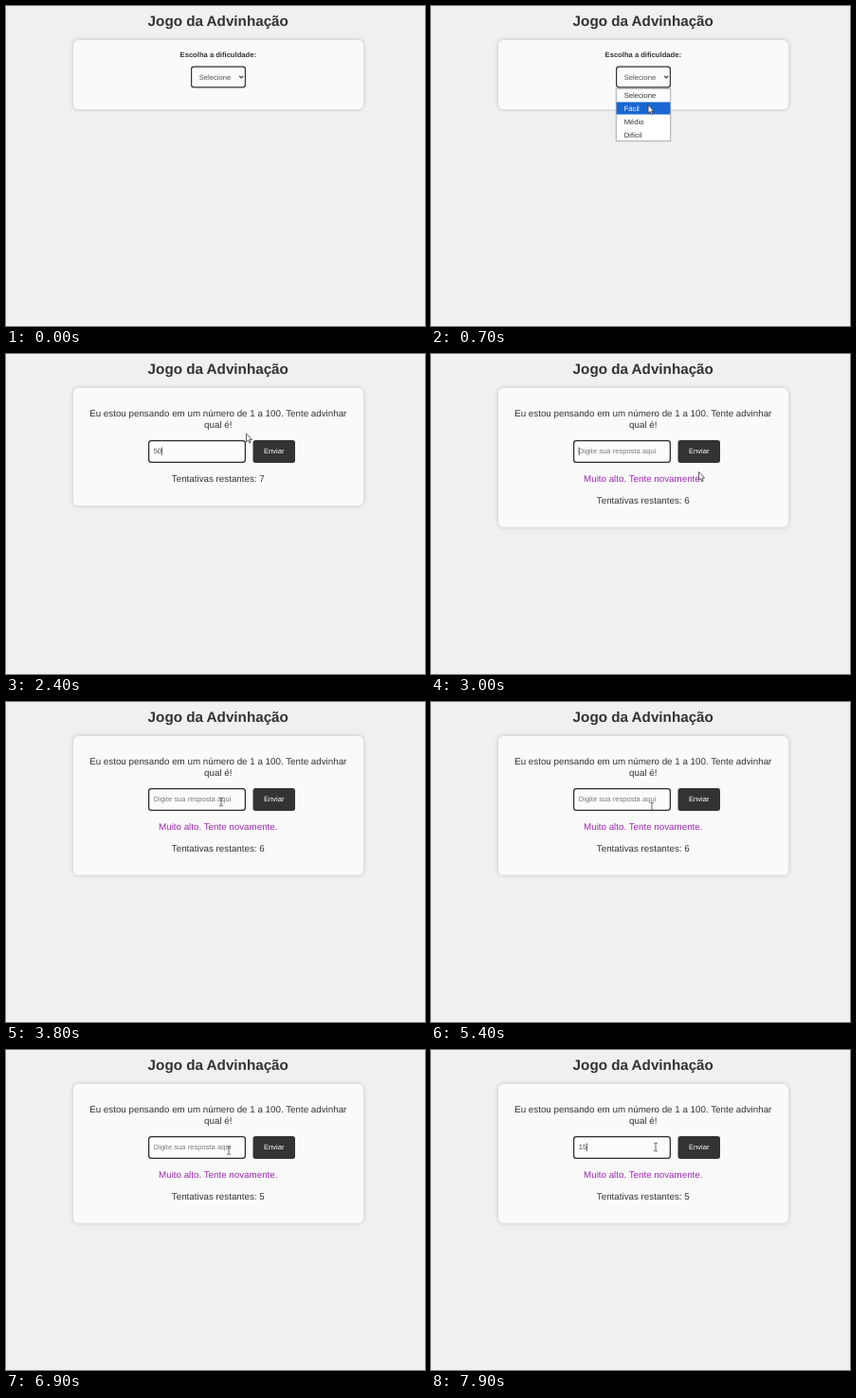
Write an HTML page with a canvas that moves like this. It is 442 px wide and 338 px high and loops after 8000 ms.

```html
<!DOCTYPE html>
<html lang="pt-BR">
<head>
<meta charset="utf-8">
<title>Jogo da Advinhação</title>
<style>
  html, body { margin: 0; width: 100%; height: 100%; overflow: hidden; background: #f1f0f1; }
  canvas { display: block; width: 442px; height: 338px; }
</style>
</head>
<body>
<canvas id="stage"></canvas>
<script>
const W = 442, H = 338, LOOP = 8000, STEP = 100;
const canvas = document.getElementById('stage');
const ctx = canvas.getContext('2d');
const dpr = window.devicePixelRatio || 1;
canvas.width = W * dpr;
canvas.height = H * dpr;

// page styles are in CSS pixels, shown at a reduced zoom
const ZOOM = 0.544;
const TITLE = 28 * ZOOM, BODY = 18 * ZOOM, SMALL = 14 * ZOOM;
const INK = '#333', MID = 223.75, ROW = 22.8;
const INPUT = { x: 150, y: 91, w: 103, h: 24 };
const BUTTON = { x: 260.5, y: 91, w: 44.5, h: 24 };
const SELECT = { x: 195, y: 63.5, w: 58, h: 23 };
const OPTIONS = ['Selecione', 'Fácil', 'Médio', 'Difícil'];

const OPEN = 400, PICK = 900, PLAY = 1000, FOCUS = 1400;
const MOVE = 400, KEY_GAP = 200, BLINK = 500;
const GUESSES = [
  { value: '50', at: 2100, sent: 2900 },
  { value: '25', at: 5500, sent: 6300 },
  { value: '15', at: 7400, sent: LOOP }
];

// pointer stops: arrival time, x, y
const STOPS = [
  [100, 362, 42], [400, 235, 77], [800, 228, 109.5], [1300, 224, 103.5],
  [2400, 253.5, 84], [2800, 283, 104], [3200, 282, 145], [3700, 227, 105.5],
  [4600, 330, 118], [5200, 233, 110.5], [6100, 270.3, 110.3], [6800, 235, 106],
  [7700, 237, 102.5]
];

const inside = (r, p) => p.x >= r.x && p.x <= r.x + r.w && p.y >= r.y && p.y <= r.y + r.h;

function pointerAt(t) {
  let [, x, y] = STOPS[0];
  for (const [at, nx, ny] of STOPS) {
    const u = Math.min(1, Math.max(0, (t - at + MOVE) / MOVE));
    const e = u * u * (3 - 2 * u);
    x += (nx - x) * e;
    y += (ny - y) * e;
  }
  return { x, y };
}

function entryAt(t) {
  const g = GUESSES.find(g => t >= g.at && t < g.sent);
  return g ? g.value.slice(0, 1 + Math.floor((t - g.at) / KEY_GAP)) : '';
}

function caretOn(t) {
  const acts = [FOCUS, ...GUESSES.flatMap(g => [g.at, g.at + KEY_GAP, g.sent])];
  const last = Math.max(...acts.filter(a => a <= t));
  return t >= FOCUS && Math.floor((t - last) / BLINK) % 2 === 0;
}

function text(str, x, y, size, color = INK, align = 'center', weight = '') {
  ctx.font = `${weight} ${size}px "Liberation Sans", Arial, sans-serif`;
  ctx.fillStyle = color;
  ctx.textAlign = align;
  ctx.fillText(str, x, y);
}

function box({ x, y, w, h }, r, fill, stroke, line = 1) {
  const d = stroke ? line / 2 : 0;
  ctx.beginPath();
  ctx.roundRect(x + d, y + d, w - 2 * d, h - 2 * d, r);
  ctx.fillStyle = fill;
  ctx.fill();
  if (stroke) {
    ctx.strokeStyle = stroke;
    ctx.lineWidth = line;
    ctx.stroke();
  }
}

function card(h) {
  ctx.save();
  ctx.shadowColor = 'rgba(0,0,0,.2)';
  ctx.shadowBlur = 10 * ZOOM * dpr;
  box({ x: 71, y: 36, w: 306, h }, 10 * ZOOM, '#fbfafb');
  ctx.restore();
}

function chooser(t, p) {
  card(73);
  text('Escolha a dificuldade:', MID, 54, SMALL, INK, 'center', 'bold');
  box(SELECT, 2.7, '#fcfbfc', INK, 1.2);
  text(OPTIONS[t < PICK ? 0 : 1], 203.7, 77.7, SMALL, '#555', 'left');
  ctx.strokeStyle = INK;
  ctx.lineWidth = 1.1;
  ctx.stroke(new Path2D('M246.2 73.9 l2 2.1 l2 -2.1'));
  if (t >= OPEN && t < PICK) dropdown(p);
}

function dropdown(p) {
  const { x, w } = SELECT, top = 87, h = 14;
  box({ x, y: top, w, h: h * OPTIONS.length }, 0, '#fff', '#767676', 0.6);
  const hot = Math.max(0, Math.floor((p.y - top) / h));
  OPTIONS.forEach((name, i) => {
    const y = top + i * h;
    if (i === hot) box({ x: x + 0.6, y: y + 0.5, w: w - 1.2, h: h - 1 }, 0, '#1967d2');
    text(name, 203.7, y + 9.7, SMALL, i === hot ? '#fff' : INK, 'left');
  });
}

function game(t, p) {
  const sent = GUESSES.filter(g => t >= g.sent).length;
  const extra = sent ? ROW : 0;
  card(124 + extra);
  text('Eu estou pensando em um número de 1 a 100. Tente advinhar', MID, 66.4, BODY);
  text('qual é!', MID, 77.5, BODY);

  box(INPUT, 2.7, '#fcfbfc', t < FOCUS ? INK : '#2c2c2d', 1.25);
  const entry = entryAt(t), left = INPUT.x + 5.7, base = 105.3;
  if (entry) text(entry, left, base, SMALL, '#4a4a4a', 'left');
  else text('Digite sua resposta aqui', left, base, SMALL, '#7b7b7b', 'left');
  if (caretOn(t)) {
    ctx.fillStyle = INK;
    ctx.fillRect(left + ctx.measureText(entry).width, 98.5, 0.7, 8.5);
  }

  box(BUTTON, 2.7, inside(BUTTON, p) ? '#4d4c4d' : '#333');
  text('Enviar', BUTTON.x + BUTTON.w / 2, base, SMALL, '#fff');

  if (sent) text('Muito alto. Tente novamente.', MID, 135.1, BODY, '#9c27b0');
  text('Tentativas restantes: ' + (7 - sent), MID, 135.1 + extra, BODY);
}

function outline(path) {
  const shape = new Path2D(path);
  ctx.lineJoin = 'round';
  ctx.fillStyle = '#fff';
  ctx.strokeStyle = '#3a3a3a';
  ctx.lineWidth = 0.8;
  ctx.fill(shape);
  ctx.stroke(shape);
}

function pointer(p, playing) {
  ctx.save();
  ctx.translate(p.x, p.y);
  if (playing && inside(INPUT, p)) {
    ctx.strokeStyle = '#444';
    ctx.lineWidth = 0.8;
    ctx.stroke(new Path2D('M-2 -4.4 Q0 -4.4 0 -3.4 Q0 -4.4 2 -4.4 M0 -3.4 V3.4 M-2 4.4 Q0 4.4 0 3.4 Q0 4.4 2 4.4'));
  } else if (playing && inside(BUTTON, p)) {
    outline('M-1 .8 Q0 -.7 1 .8 V4 Q2 3.2 2.7 4.2 Q3.6 3.5 4.1 4.5 Q5.2 4.1 5.3 5.5 ' +
      'V8 L4.4 10.6 H-.7 L-3 7.1 Q-3.4 5.5 -2.1 5.8 L-1 7 Z');
  } else {
    outline('M0 0 V8.8 L2 7 L3.3 10 L4.7 9.4 L3.4 6.5 H6 Z');
  }
  ctx.restore();
}

function draw(now) {
  const t = Math.floor((now % LOOP) / STEP) * STEP;
  const p = pointerAt(t), playing = t >= PLAY;
  ctx.setTransform(dpr, 0, 0, dpr, 0, 0);
  ctx.textRendering = 'geometricPrecision';
  ctx.fillStyle = '#f1f0f1';
  ctx.fillRect(0, 0, W, H);
  text('Jogo da Advinhação', MID, 21, TITLE, INK, 'center', 'bold');
  if (playing) game(t, p);
  else chooser(t, p);

  // the pointer hides while keys are pressed
  const typing = GUESSES.some(g => t >= g.at && t < g.at + KEY_GAP + STEP);
  if (t >= STOPS[0][0] && !typing) pointer(p, playing);
}

const start = performance.now();
function tick() {
  draw(performance.now() - start);
  requestAnimationFrame(tick);
}
tick();
</script>
</body>
</html>
```
